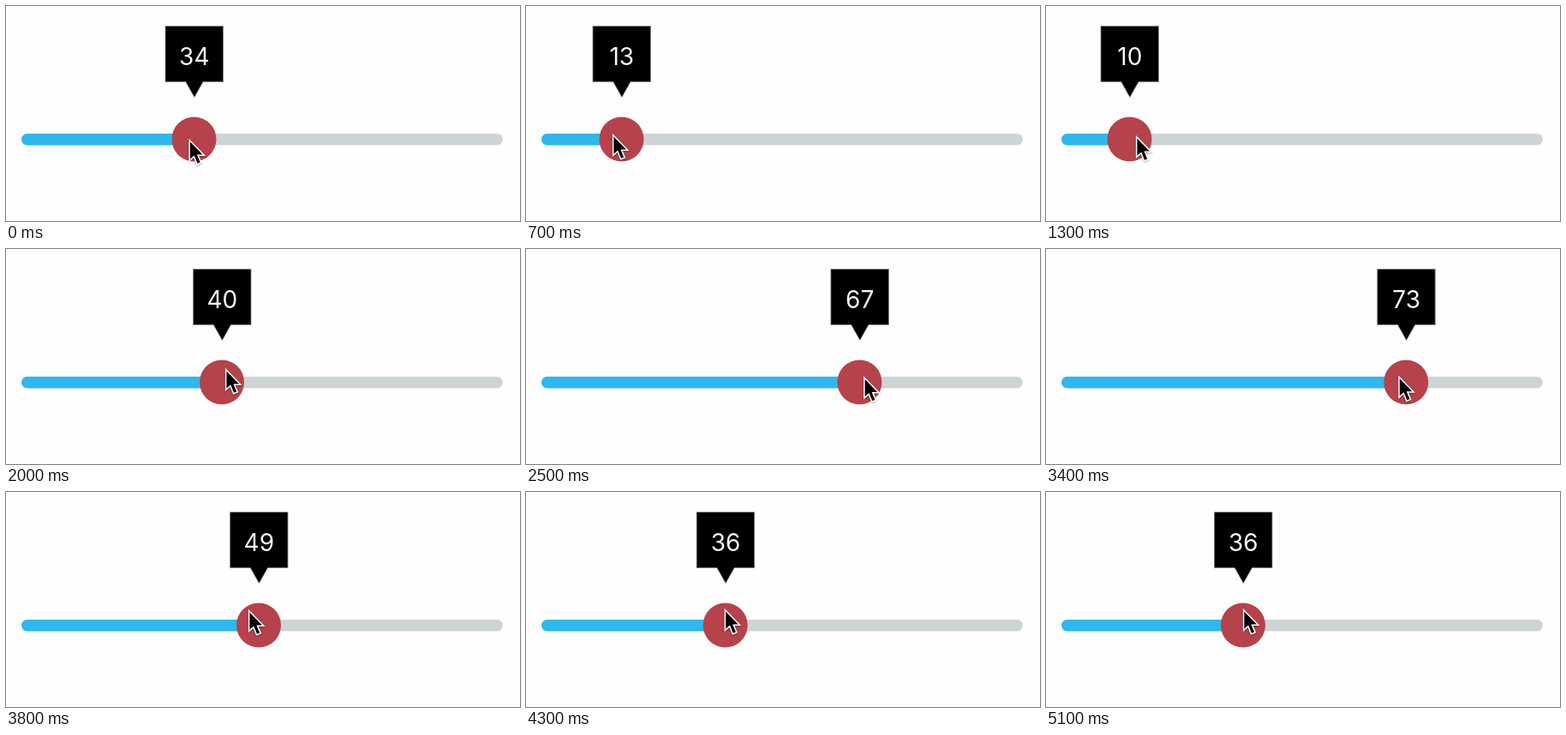
An HTML page that plays this animation: 600 by 251 pixels, repeating every 5.6 s.

```html
<!DOCTYPE html>
<html lang="en">
<head>
<meta charset="utf-8">
<title>Range slider</title>
<style>
  html, body { margin: 0; width: 100%; height: 100%; overflow: hidden; background: #fffeff; }
  svg { display: block; width: 100%; height: 100%; }
  text { font: 400 28px Inter, "Open Sans", sans-serif; fill: #f6f6f6; text-anchor: middle; }
  #cursor { filter: drop-shadow(0 1.5px 1.2px rgba(0, 0, 0, .35)); }
</style>
</head>
<body>
<svg viewBox="0 0 600 251">
  <rect x="18" y="149" width="562" height="13.5" rx="6.7" fill="#ced4d6"/>
  <rect id="fill" x="18" y="149" height="13.5" rx="6.7" fill="#2eb8ee"/>
  <g id="thumb">
    <path d="M-33.5 23.5H34V88.5H10.5L.4 106.5L-9.7 88.5H-33.5Z" stroke="#8d8088" stroke-width=".8"/>
    <text id="label" x=".3" y="69"></text>
    <circle cy="155.5" r="26" fill="#b6424b"/>
  </g>
  <path id="cursor" d="M1.4 3.4V23.8L6.2 19.4L10 28.7L13.2 27.4L9.4 18.4H16Z"
        stroke="#fff" stroke-width="3" paint-order="stroke"/>
</svg>
<script>
  const LOOP = 5600, STEP = 100;

  // [step, thumb centre, pointer offset from it, pointer y]
  const keys = [
    [0, 219.5, -6, 155],
    [6, 139.5, -10, 150],
    [7, 111.5, -10.5, 149],
    [10.4, 67, -2, 150],
    [13, 97.5, 7.5, 151],
    [18, 218, 5, 141],
    [20, 252, 4, 139],
    [24, 355.5, 5, 146],
    [29, 512.5, 1.5, 158],
    [30, 514.5, -2, 158],
    [38, 295, -12, 137],
    [44, 230, 0, 136],
    [56, 230, 0, 136]
  ];

  const secant = (i, c) => (keys[i + 1][c] - keys[i][c]) / (keys[i + 1][0] - keys[i][0]);

  // Flat at the ends and at turning points, otherwise the harmonic mean of both sides.
  function slope(i, c) {
    if (i === 0 || i === keys.length - 1) return 0;
    const a = secant(i - 1, c), b = secant(i, c);
    return a * b > 0 ? 2 * a * b / (a + b) : 0;
  }

  // Cubic Hermite curve through column c of the keys.
  function curve(step, c) {
    const j = keys.findIndex(k => k[0] > step), i = j - 1;
    const span = keys[j][0] - keys[i][0];
    const u = (step - keys[i][0]) / span, v = 1 - u;
    return v * v * (1 + 2 * u) * keys[i][c] + u * u * (1 + 2 * v) * keys[j][c]
      + span * u * v * (v * slope(i, c) - u * slope(j, c));
  }

  const $ = id => document.getElementById(id);
  const fill = $("fill"), thumb = $("thumb"), label = $("label"), cursor = $("cursor");

  function draw(time) {
    const step = Math.floor(time % LOOP / STEP);
    const [x, dx, y] = [1, 2, 3].map(c => curve(step, c));
    fill.setAttribute("width", x - 18);
    thumb.setAttribute("transform", `translate(${x} 0)`);
    label.textContent = Math.floor((x - 44.5) / 5.1);
    cursor.setAttribute("transform", `translate(${x + dx} ${y})`);
  }

  const start = performance.now();
  function tick() {
    draw(performance.now() - start);
    requestAnimationFrame(tick);
  }
  tick();
</script>
</body>
</html>
```
